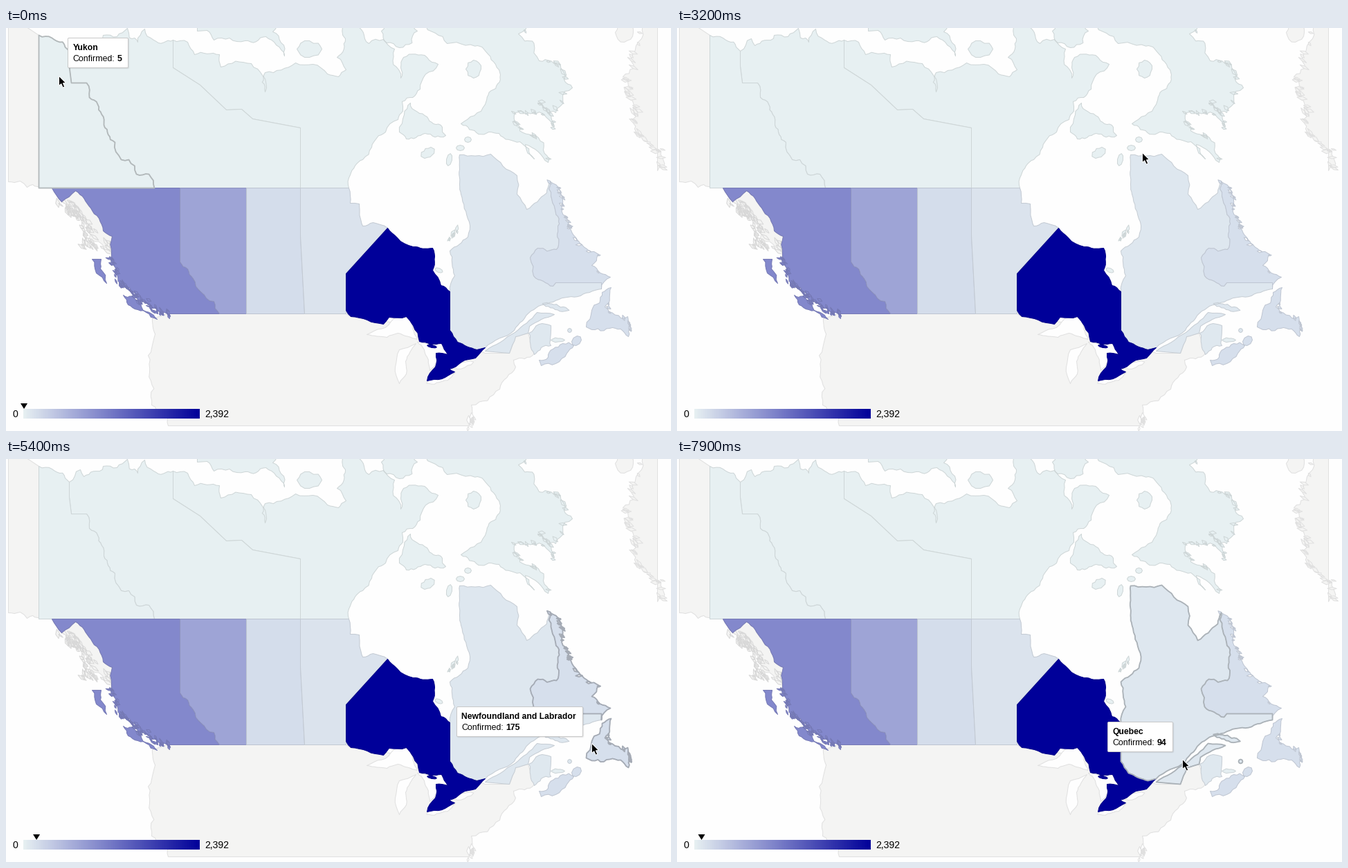
Write a matplotlib script that moves like this. It is 961x583 px and loops after 8 s.

```python
import random
import numpy as np
import matplotlib.pyplot as plt
from matplotlib.animation import FuncAnimation
from matplotlib.colors import LinearSegmentedColormap
from matplotlib.patches import FancyBboxPatch, PathPatch, Polygon
from matplotlib.path import Path

W, H, DPI = 961, 583, 64
PX = 72 / DPI
STEP, FRAMES = 100, 80
TOP = 2392
SCALE = LinearSegmentedColormap.from_list('cases', ['#e7f0f2', '#000099'], 512)
PAPER, LAND, LAND_EDGE = '#fefefe', '#f4f4f3', '#e0e0e0'
N60, N49 = 231, 413


# --- shape rules ----------------------------------------------------------
def line(*xy):
    return list(zip(xy[::2], xy[1::2]))


def split(a, b, jag, rng):
    """Midpoint displacement: replace a long edge by a ragged one."""
    dx, dy = b[0] - a[0], b[1] - a[1]
    if np.hypot(dx, dy) < 7:
        return [a]
    k = rng.uniform(-jag, jag)
    m = ((a[0] + b[0]) / 2 - k * dy, (a[1] + b[1]) / 2 + k * dx)
    return split(a, m, jag, rng) + split(m, b, jag, rng)


def coast(*xy, jag=.16):
    rng = random.Random(int(sum(xy)))
    pts = line(*xy)
    out = []
    for a, b in zip(pts, pts[1:]):
        out += split(a, b, jag, rng)
    return out + pts[-1:]


def isle(*xy, jag=.2):
    return coast(*xy, *xy[:2], jag=jag)


def blob(x, y, rx, ry, tilt=0):
    """A ragged, rotated ellipse."""
    a = np.linspace(0, 2 * np.pi, 9)[:-1]
    u, v = rx * np.cos(a), ry * np.sin(a)
    c, s = np.cos(tilt), np.sin(tilt)
    return isle(*np.column_stack([x + u * c - v * s, y + u * s + v * c]).ravel())


def islets(shore, n, spread, size, tilt, seed=1):
    """Slanted slivers scattered along a shore."""
    rng = random.Random(seed)
    rings = []
    for _ in range(n):
        x, y = (p + rng.uniform(-spread, spread) for p in rng.choice(shore))
        a, r = tilt + rng.uniform(-.5, .5), size * rng.uniform(.5, 1.3)
        c, d, w = r * np.cos(a), r * np.sin(a), rng.uniform(.2, .5)
        rings.append([(x - c, y - d), (x + w * d, y - w * c), (x + c, y + d), (x - w * d, y + w * c)])
    return rings


def outline(rings):
    return Path.make_compound_path(*[Path(r + r[:1], closed=True) for r in rings])


# --- shared borders -------------------------------------------------------
yukon_east = line(91, 33, 91, 55, 94, 79) + coast(116, 79, 120, 100, 132, 110, 141, 140, 157, 165, 166, 190,
                                                  177, 190, 188, 211, 206, 211, 214, N60)
nwt_east = line(241, 17, 241, 57, 280, 82, 318, 118, 340, 117, 356, 131, 425, 144, 425, N60)
inlet = coast(66, N60, 80, 251, 100, 235, 122, 260, 140, 293, 153, 301, 152, 325, jag=.1)
rockies = line(251, N60, 251, 338) + coast(251, 338, 270, 362, 300, 395, 308, N49)
prairie = line(425, N60, 425, 300, 431, N49)
ottawa = coast(641, 437, 652, 454, 680, 465, 692, 462, jag=.08)
labrador_west = coast(786, 222, 793, 262, 797, 290, 795, 320, 768, 318, 757, 332, 762, 358, 790, 373)
labrador_west += line(794, 368, 860, 368, 860, 377)

# --- provinces and territories --------------------------------------------
yukon = line(47, N60, 47, 10) + coast(47, 10, 66, 14, 91, 33) + yukon_east
nwt = yukon_east[::-1] + coast(91, 33, 107, 15, 112, 25, 140, 10, 160, 12, 175, 0, 190, 20, 200, 1, 213, 17,
                               241, 17, jag=.25) + nwt_east

hudson = coast(505, -8, 524, 22, 545, 16, 561, 30, 570, 72, 574, 42, 608, 42, 624, 52, 598, 88, 572, 106, 566, 132,
               548, 150, 528, 172, 515, 190, 497, 212, 495, N60)
nunavut = nwt_east[::-1] + coast(241, 17, 262, 20, 272, 38, 308, 38, 310, 56, 354, 51, 374, 92, 374, 64, 418, 50,
                                 464, 66, 480, 70, 491, 60, 478, 42, 490, 15, 488, -8) + hudson
victoria = line(276, -8, 276, 4) + coast(290, 3, 300, 17, 345, 18, 375, 12, 402, 40, 385, 5, 402, -8)
baffin_east = coast(757, -8, 740, 8, 770, 47, 818, 86, 794, 122, 768, 108, 790, 142, 735, 122, 776, 176, 783, 194,
                    jag=.24)
baffin = baffin_east + coast(783, 194, 750, 168, 763, 189, 712, 152, 657, 138, 692, 110, 712, 60, 690, 30, 637, 22,
                             602, -8)
arctic_isles = [victoria, baffin, blob(675, 59, 11, 13), blob(609, 180, 11, 7, -.5), blob(640, 190, 4, 9, .2),
                blob(438, 30, 18, 12), blob(656, 173, 6, 4), blob(667, 161, 5, 4), blob(568, 4, 26, 24),
                isle(575, 125, 584, 108, 608, 128, 630, 143, 635, 155, 605, 152, 578, 160, 568, 150)]

bc_coast = coast(152, 325, 158, 347, 178, 375, 205, 400, 233, N49, jag=.25)
bc = rockies + bc_coast[::-1] + inlet[::-1]
vancouver = isle(169, 386, 195, 393, 218, 421, 190, 407)
haida = isle(124, 334, 137, 334, 136, 348, 145, 369, 130, 354)

alberta = rockies + line(347, N49, 347, N60)
sask = prairie + line(347, N49, 347, N60)
bay_west = coast(495, N60, 497, 253, 510, 254, 515, 286, 530, 281, 551, 289, jag=.1)
manitoba = prairie[::-1] + bay_west + line(491, 355, 491, N49)
superior = coast(597, 453, 588, 430, 578, 417, 553, 418, 545, 428, 498, 417, 491, 408, jag=.1)
huron = coast(692, 462, 678, 477, 640, 493, 648, 497, 608, 510, 620, 490, 621, 470, 638, 472, 629, 456, 597, 453,
              jag=.1)
james = coast(551, 289, 565, 303, 588, 316, 616, 318, 616, 350, 628, 372, 641, 381, jag=.1)
ontario = james + ottawa + huron + superior + line(491, 355)

ungava = coast(641, 381, 648, 358, 641, 322, 667, 302, 669, 280, 657, 240, 655, 183, 700, 182, 738, 213, 738, 240,
               752, 262, 781, 238, 786, 222, jag=.1)
north_shore = coast(860, 377, 790, 396, 758, 409, 734, 437, 692, 462, jag=.08)
quebec = ungava + labrador_west + north_shore + ottawa[::-1]
gaspe = coast(692, 467, 735, 440, 767, 411, 792, 414, 756, 431, 754, 441, 736, 446, 727, 470, jag=.06)
gulf_isles = [blob(794, 403, 20, 4, .25), blob(814, 437, 3, 3)]

labrador_east = coast(860, 377, 873, 360, 846, 343, 856, 327, 813, 285, 786, 222)
labrador = labrador_west + labrador_east
island = isle(874, 375, 865, 403, 898, 417, 899, 446, 872, 434, 838, 432, 846, 408, 861, 382)

brunswick = isle(755, 441, 770, 428, 787, 430, 787, 459, 763, 472)
scotia = isle(770, 480, 790, 464, 820, 459, 810, 470, 773, 488)

# name: cases, rings
REGIONS = {
    'Nunavut': (0, [nunavut] + arctic_isles + islets(baffin_east, 30, 3, 5, .6)),
    'Northwest Territories': (2, [nwt]),
    'Yukon': (5, [yukon]),
    'British Columbia': (1037, [bc, vancouver, haida] + islets(bc_coast, 60, 4, 4, .8)),
    'Alberta': (754, [alberta]),
    'Saskatchewan': (193, [sask]),
    'Manitoba': (127, [manitoba]),
    'Quebec': (94, [quebec, gaspe] + gulf_isles),
    'Ontario': (TOP, [ontario, blob(615, 460, 7, 2, .2)]),
    'Newfoundland and Labrador': (175, [labrador, island] + islets(labrador_east[8:], 22, 2, 4, .4)
                                  + islets(island[6:22], 8, 2, 4, 1)),
    'New Brunswick': (81, [brunswick]),
    'Nova Scotia': (173, [scotia, blob(824, 452, 8, 6, -.8)]),
    'Prince Edward Island': (21, [blob(797, 451, 10, 2.5)])}

# --- neighbouring land and lakes ------------------------------------------
alaska = line(3, 222, 3, -8, 20, -8, 47, 10, 47, N60, 66, N60) + coast(66, N60, 38, 226, 30, 230, 20, 221, 3, 222)
panhandle_shore = coast(152, 325, 118, 308, 95, 268, 80, 251, jag=.25)
atlantic = coast(668, 575, 672, 545, 713, 522, 736, 490, 733, 480, 763, 470)
usa = coast(211, 420, 213, 450, 207, 498, 210, 545, 234, 575) + atlantic + line(
    754, 441, 736, 446, 727, 470, 692, 470, 590, 430, 498, 417, 491, N49, 233, N49)
greenland_shore = coast(941, 206, 918, 155, 905, 105, 891, 70, 905, 38, 918, 15, 914, -8, jag=.3)
greenland = greenland_shore + line(941, -8)
lakes = [isle(521, 443, 560, 420, 586, 418, 594, 450, 566, 441, 550, 447, jag=.1),
         isle(562, 490, 568, 465, 592, 456, 577, 482, 578, 500, 568, 514, jag=.1),
         isle(594, 454, 629, 456, 638, 472, 612, 495, 604, 465, jag=.1),
         blob(628, 506, 22, 5, -.35), blob(661, 487, 15, 4, -.3)]

# --- stage ----------------------------------------------------------------
fig = plt.figure(figsize=(W / DPI, H / DPI), dpi=DPI, facecolor=PAPER)
ax = fig.add_axes([0, 0, 1, 1])
ax.axis('off')


def paint(rings, fill, stroke=LAND_EDGE):
    ax.add_patch(PathPatch(outline(rings), fc=fill, ec=stroke, lw=PX, joinstyle='round'))


def shade(cases, k):
    return tuple(k * c for c in SCALE(cases / TOP)[:3])


paint([usa], LAND)
paint(lakes + islets(atlantic[:5], 9, 5, 6, 1.3), PAPER)
paint([alaska], LAND)
paint([greenland, blob(893, 6, 13, 14)], LAND)
paint(islets(greenland_shore, 40, 4, 6, .5), LAND)
paint([inlet + panhandle_shore], LAND)
paint(islets(panhandle_shore, 70, 9, 6, 1), LAND, '#d8d8d8')
for cases, rings in REGIONS.values():
    paint(rings, shade(cases, 1), shade(cases, .89))
paint(islets(line(640, 303, 645, 297, 649, 292), 8, 3, 5, -1.2) + [blob(625, 350, 6, 3, .4)],
      shade(0, 1), shade(0, .89))

BAR = (24.5, 279.5)
ax.imshow(np.linspace(0, 1, 255)[None], cmap=SCALE, extent=(*BAR, 564.5, 550.5), aspect='auto', zorder=2)


def label(x, y, s, px, weight='normal', z=6):
    return ax.text(x, y, s, fontsize=px * PX, family='Liberation Sans', weight=weight, va='baseline', zorder=z)


def panel(z, **style):
    return ax.add_patch(FancyBboxPatch((0, 0), 1, 1, boxstyle='round,pad=0,rounding_size=1.5', zorder=z, **style))


label(9.5, 562.5, '0', 14)
label(286.5, 562.5, '2,392', 14)
marker = ax.add_patch(Polygon([(0, 0)] * 3, fc='k', lw=0, zorder=5))
glow = ax.add_patch(PathPatch(outline([yukon]), fc='none', lw=1.8 * PX, joinstyle='round', zorder=4))
shadow = panel(7, fc=(0, 0, 0, .06), ec=(0, 0, 0, .04), lw=2 * PX)
box = panel(8, fc='white', ec='#c8c8c8', lw=PX)
title = label(0, 0, '', 12.1, 'bold', 9)
caption = label(0, 0, 'Confirmed:', 12.4, 'normal', 9)
count = label(0, 0, '', 12.4, 'bold', 9)
tip = [shadow, box, title, caption, count, marker, glow]

ARROW = np.array(line(0, 0, 0, 14, 3.3, 11.2, 5.7, 16.6, 8.2, 15.5, 5.9, 10.3, 10, 10))
cursor = ax.add_patch(Polygon(ARROW, fc='k', ec='white', lw=.9 * PX, zorder=12))
ax.set_xlim(-.5, W - .5)
ax.set_ylim(H - .5, -.5)

# --- motion ---------------------------------------------------------------
# time, x, y
ROUTE = np.array([
    (0, 76, 69), (200, 38, 74), (500, 38, 74), (1200, 208, 81), (1500, 288, 95), (2700, 590, 140), (3000, 668, 176),
    (3100, 668, 176), (3200, 672, 180), (3800, 750, 250), (3900, 750, 250), (4400, 808, 286), (4900, 862, 350),
    (5300, 844, 415), (5400, 846, 411), (6000, 798, 450), (6300, 786, 451), (6700, 752, 440), (7200, 736, 436),
    (7400, 736, 436), (7500, 735, 435), (7700, 735, 435), (7800, 727, 436), (7900, 730, 434)])
HOVER = [(0, 'Yukon'), (200, None), (600, 'Yukon'), (900, 'Northwest Territories'), (1500, 'Nunavut'), (2900, None),
         (3300, 'Quebec'), (4300, 'Newfoundland and Labrador'), (5600, None), (5900, 'Nova Scotia'),
         (6200, 'New Brunswick'), (6700, 'Quebec')]
GLOWS = {name: outline(rings) for name, (_, rings) in REGIONS.items()}
LAG, TIP_H = 50, 43


def pointer(t):
    return tuple(np.interp(t, ROUTE[:, 0], ROUTE[:, k]) for k in (1, 2))


def text_width(text):
    return text.get_window_extent().width * DPI / fig.dpi


def show_tip(name, x, y):
    cases = REGIONS[name][0]
    title.set_text(name)
    count.set_text(f'{cases:,}')
    width = round(16 + max(text_width(title), 64 + text_width(count)))
    left = x - 12 - width if x - 12 >= width else x + 13
    left, top = round(left), round(y - 12 - TIP_H)
    box.set_bounds(left, top, width, TIP_H)
    shadow.set_bounds(left + 1, top + 1, width, TIP_H)
    for text, dx, dy in ((title, 7, 17.5), (caption, 7, 33.5), (count, 71, 33.5)):
        text.set_position((left + dx, top + dy))
    m = 25 + 254 * cases / TOP
    marker.set_xy([(m - 5, 542.5), (m + 5, 542.5), (m, 550.5)])
    glow.set_path(GLOWS[name])
    glow.set_edgecolor(shade(cases, .77))


def draw(i):
    t = i * STEP
    cursor.set_xy(ARROW + pointer(t))
    name = [n for start, n in HOVER if start <= t][-1]
    for part in tip:
        part.set_visible(name is not None)
    if name:
        show_tip(name, *pointer(t - LAG))
    return tip + [cursor]


anim = FuncAnimation(fig, draw, frames=FRAMES, interval=STEP, repeat=True, repeat_delay=0)
plt.show()
```
